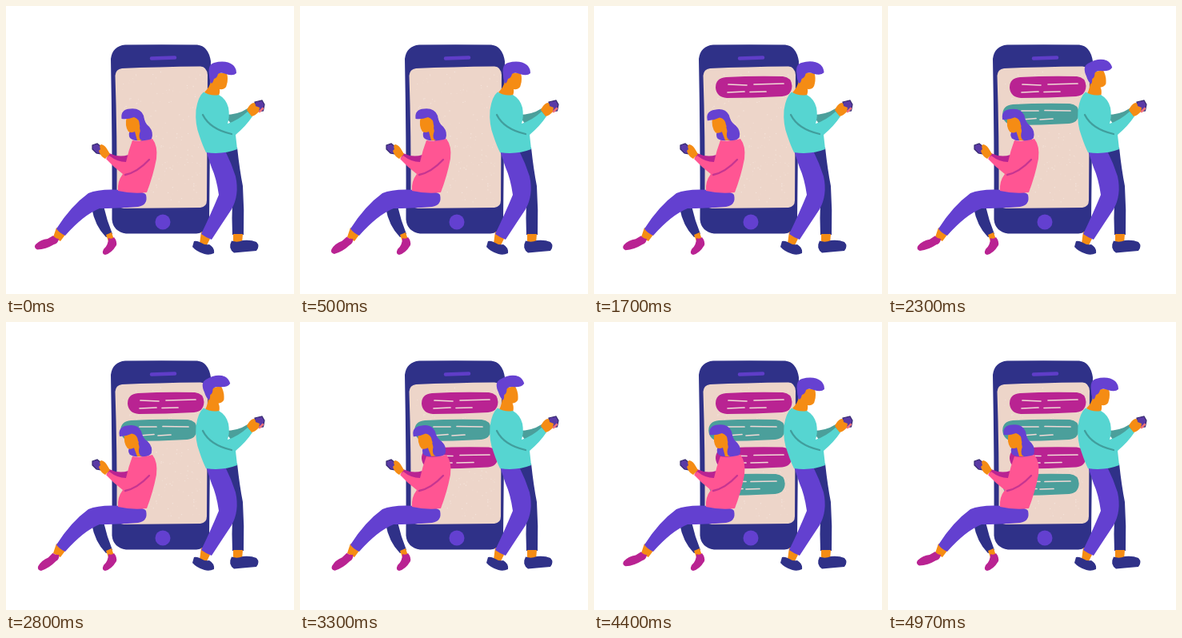
Write an HTML page that moves like this. It is 360 px wide and 360 px high and loops after 5000 ms.

```html
<!DOCTYPE html>
<html lang="en">
<head>
<meta charset="utf-8">
<title>Chatting</title>
<style>
  html, body { margin: 0; width: 100%; height: 100%; overflow: hidden; background: #fff; }
  svg { display: block; width: 100vw; height: 100vh; }
  .navy { fill: #2f3188; }
  .violet { fill: #6340d0; }
  .hair { fill: #6641d1; }
  .skin { fill: #f58c14; }
  .plum { fill: #b92392; }
  .sea { fill: #4b9f9b; }
  .teal { fill: #56d5d1; }
  .pink { fill: #ff5593; }
  .sand { fill: #edd5c9; }
  .pad { fill: #5a3aa5; stroke: #34286f; stroke-width: 1.2; }
  .line { fill: none; stroke-width: 2.3; stroke-linecap: round; }
  .text { fill: none; stroke: #f1d9d6; stroke-width: 1.7; stroke-linecap: round; }
</style>
</head>
<body>
<svg viewBox="0 0 360 360">
  <defs>
    <filter id="rough" x="0" y="0" width="360" height="360" filterUnits="userSpaceOnUse" color-interpolation-filters="sRGB">
      <feTurbulence id="noise" type="fractalNoise" baseFrequency=".3" numOctaves="2" seed="1"/>
      <feDisplacementMap in="SourceGraphic" scale="1.1" xChannelSelector="R" yChannelSelector="G"/>
    </filter>
    <path id="pill" d="M165 89 Q200 87 236 88 Q247 89 247.500 100 Q247 112 235 113 Q200 115 166 115 Q153 114 152 102 Q152 90 165 89Z"/>
  </defs>
  <g filter="url(#rough)">
    <!-- phone -->
    <path class="navy" d="M149 48.500 Q195 48 239 48.500 Q253 50 256 69 Q255 170 254 268 Q252 283 238 284.500 L150 284.500 Q134 282 132.500 267 Q133 170 131 66 Q133 50 149 48.500Z"/>
    <path class="sand" d="M145 78 Q190 76 243 75.500 Q251 76 252 86 L251 243 Q251 251 243 252 L147 253 Q139 252 138.500 244 Q139 160 136.500 87 Q137 79 145 78Z"/>
    <g id="grain" fill="#faf0ea" opacity=".55"></g>
    <path d="M182 65.500 L211 64.500" stroke="#5f3dc8" stroke-width="4.500" stroke-linecap="round"/>
    <circle class="violet" cx="196" cy="270" r="9.500"/>

    <g class="bubble">
      <use href="#pill" class="plum"/>
      <path class="text" d="M168 98 L191 99 M200 98 L237 97 M167 108 L188 107 M195 107.500 L215 107"/>
    </g>
    <g class="bubble">
      <use href="#pill" class="sea" x="-8.800" y="34"/>
      <path class="text" d="M167 131 L188 131 M196 130.500 L228 131 M167 142 L185 140.500 M190 142 L206 141"/>
    </g>
    <g class="bubble">
      <use href="#pill" class="plum" y="68.500"/>
      <path class="text" d="M168 167 L191 167.500 M200 166.500 L237 166 M167 176 L190 176 M196 176 L217 175.500"/>
    </g>
    <g class="bubble">
      <use href="#pill" class="sea" x="-8.800" y="102"/>
      <path class="text" d="M167 199 L190 199.500 M196 199.500 L228 199 M167 209 L186 208.500 M190 209 L207 208.500"/>
    </g>

    <!-- man -->
    <path class="navy" d="M270 182 L289 177 Q292 205 296 225 Q298 255 297 286 L283 286 Q282 265 283 245Z"/>
    <path class="skin" d="M284 285 L296 285 L295 297 L284 297Z"/>
    <path class="navy" d="M282 293.500 Q289 296 296 293 Q306 292 313 295 Q318 300 313 306 Q298 307 285 308.500 Q277 303 282 293.500Z"/>
    <path class="skin" d="M244 282 L255 291 L251 299 L242 297Z"/>
    <path class="violet" d="M250 181 L274 181 Q282 197 287 213 Q292 236 282 254 Q270 272 257 292 Q251 290 244 285 Q257 258 266 236 Q263 215 257 202Z"/>
    <path class="navy" d="M235 294 Q239 293 243 295.500 Q248 299 254 298 Q261 302 260 309 Q254 312 248 310 Q238 307 233 301Z"/>
    <g id="manHead">
      <path class="skin" d="M258 83 L276 84 Q278 91 276 98 Q275 105 267 104 Q268 108 265 114 Q256 114 248 108 Q255 101 257 92Z"/>
      <path class="hair" d="M254 86 Q252 73 260 71 Q275 67 284 74 Q288 78 288 84 Q284 88 275 85 Q268 82 265 85 Q264 90 260 91 Q259 95 257 97 Q254 93 254 86Z"/>
    </g>
    <path class="sea" d="M273 136 Q290 136 302 128 L306 136 L284 151Z"/>
    <path class="teal" d="M247 107.500 Q256 113 266 111 Q275 116 278 127 Q280 138 277 147 Q290 143 302 132 L308 138 Q300 150 287 161 L289 179 Q271 186 250 183 Q246 175 242 163 Q236 148 237.500 130 Q240 113 247 107.500Z"/>
    <path class="line" stroke="#419e9d" d="M246 136 Q255 154 282 160"/>
    <path class="pad" d="M311 120 L320 118 L323 123 L321.500 131 L312 132Z"/>
    <path class="skin" d="M301 130 Q304 123 309 121 Q312 121 312 125 L317 127 L316 132 Q312 137 307 138Z"/>
    <path d="M317 132 L321 128" stroke="#f0717d" stroke-width="2.500" stroke-linecap="round"/>

    <!-- woman -->
    <path class="navy" d="M107 252 L122 250 Q126 268 133 285 L125 289 Q111 275 107 252Z"/>
    <path class="skin" d="M125 286 L132 283 L135 292 L128 294Z"/>
    <path class="plum" d="M128 290 Q132 292 135 289 Q139 294 138 299 Q132 309 124 311 Q119 310 122 304 Q128 299 128 290Z"/>
    <path class="skin" d="M63 277 L74 286 L68 294 L59 289Z"/>
    <g id="foot">
      <path class="plum" d="M37 298 Q43 292 52 291 L59 287 Q62 291 66 291 Q65 297 60 298 Q50 304 39 304.500 Q34 302 37 298Z"/>
    </g>
    <path class="violet" d="M103 234 Q117 228 145 230 Q172 231 175 236 Q178 249 165 251 Q137 253 117 253 Q97 261 74 287 Q67 284 63 278.500 Q81 250 103 234Z"/>
    <g id="herHead">
      <path class="hair" d="M162 134 Q173 138 173 143 Q175 149 179 151 Q185 158 182 166 Q175 172 167 168 Q160 169 155 165 Q152 160 156 155Z"/>
      <path class="skin" d="M151 138 Q148 150 153 157 Q157 159 161 157 L164 168 L170 168 L167 152 Q170 146 168 138Z"/>
      <path class="hair" d="M144.500 141 Q143 129 155 128.500 Q168 127 172 137 Q173 146 178 150 Q184 157 181 166 Q174 171 168 167 Q165 163 168 156 Q169 152 167 149 Q167 141 160 139 Q152 142 144.500 141Z"/>
    </g>
    <path class="plum" d="M129 184 Q141 190 153 186 L152 197 Q136 198 126 190Z"/>
    <path class="pink" d="M158 168 Q168 170 183 166 Q190 175 188 191 Q184 212 176 233 Q158 235 140 231 Q139 219 146 210 Q134 201 125 191 L129 187 Q139 195 150 195 Q153 181 158 168Z"/>
    <path class="line" stroke="#c63591" d="M149 211 Q164 208 179 192"/>
    <path class="pad" d="M108 174 L114 172 L119 176 L119 185 L113 184 L108 179Z"/>
    <path class="skin" d="M116 181 L118 179 Q116 174 119 173 Q124 174 127 180 L130 185 L124 191 Q118 188 116 181Z"/>
  </g>
</svg>
<script>
  const $ = id => document.getElementById(id);
  const bubbles = document.querySelectorAll('.bubble');
  const LOOP = 5000;

  // pairs of [time, value], eased between
  const foot = [[0, 0], [850, -20], [1950, 1], [3050, -18], [4000, 1], [4450, -2], [5000, 0]];
  const herHead = [[0, 0], [1100, 0], [1650, -6], [2300, -3], [3000, -6], [3700, -6], [4400, 0]];
  const manHead = [[0, 0], [1600, 0], [2150, -16], [3350, -16], [3950, 0]];
  const pops = [[550, 247, 101], [1850, 143, 135], [2850, 247, 170], [4050, 143, 203]];

  const ease = x => (1 - Math.cos(Math.PI * x)) / 2;

  function at(keys, t) {
    const i = keys.findIndex(k => k[0] > t);
    if (i < 0) return keys[keys.length - 1][1];
    const [t0, a] = keys[i - 1], [t1, b] = keys[i];
    return a + (b - a) * ease((t - t0) / (t1 - t0));
  }

  const turn = (id, deg, x, y) => $(id).setAttribute('transform', `rotate(${deg} ${x} ${y})`);

  let seed = 7;
  const rand = () => (seed = seed * 16807 % 2147483647) / 2147483647;
  let dots = '';
  for (let i = 0; i < 200; i++) {
    const x = 142 + rand() * 105, y = 82 + rand() * 166, r = .25 + rand() * .5;
    dots += `<circle cx="${x}" cy="${y}" r="${r}"/>`;
  }
  $('grain').innerHTML = dots;

  let last = -1;
  function draw(now) {
    const ms = now % LOOP;
    // uneven 70/30 ms steps
    const step = 2 * Math.floor(ms / 100) + (ms % 100 >= 70 ? 1 : 0);
    if (step !== last) {
      last = step;
      const t = step * 50;
      turn('foot', at(foot, t), 65, 290);
      turn('herHead', at(herHead, t), 164, 168);
      turn('manHead', at(manHead, t), 258, 108);
      pops.forEach(([start, x, y], i) => {
        const k = ease(Math.min(1, Math.max(0, (t - start) / 300)));
        bubbles[i].style.display = k ? '' : 'none';
        bubbles[i].setAttribute('transform', `translate(${x} ${y}) scale(${k}) translate(${-x} ${-y})`);
      });
      $('noise').setAttribute('seed', 1 + (step >> 1) % 4);
    }
    requestAnimationFrame(draw);
  }
  draw(0);
</script>
</body>
</html>
```
